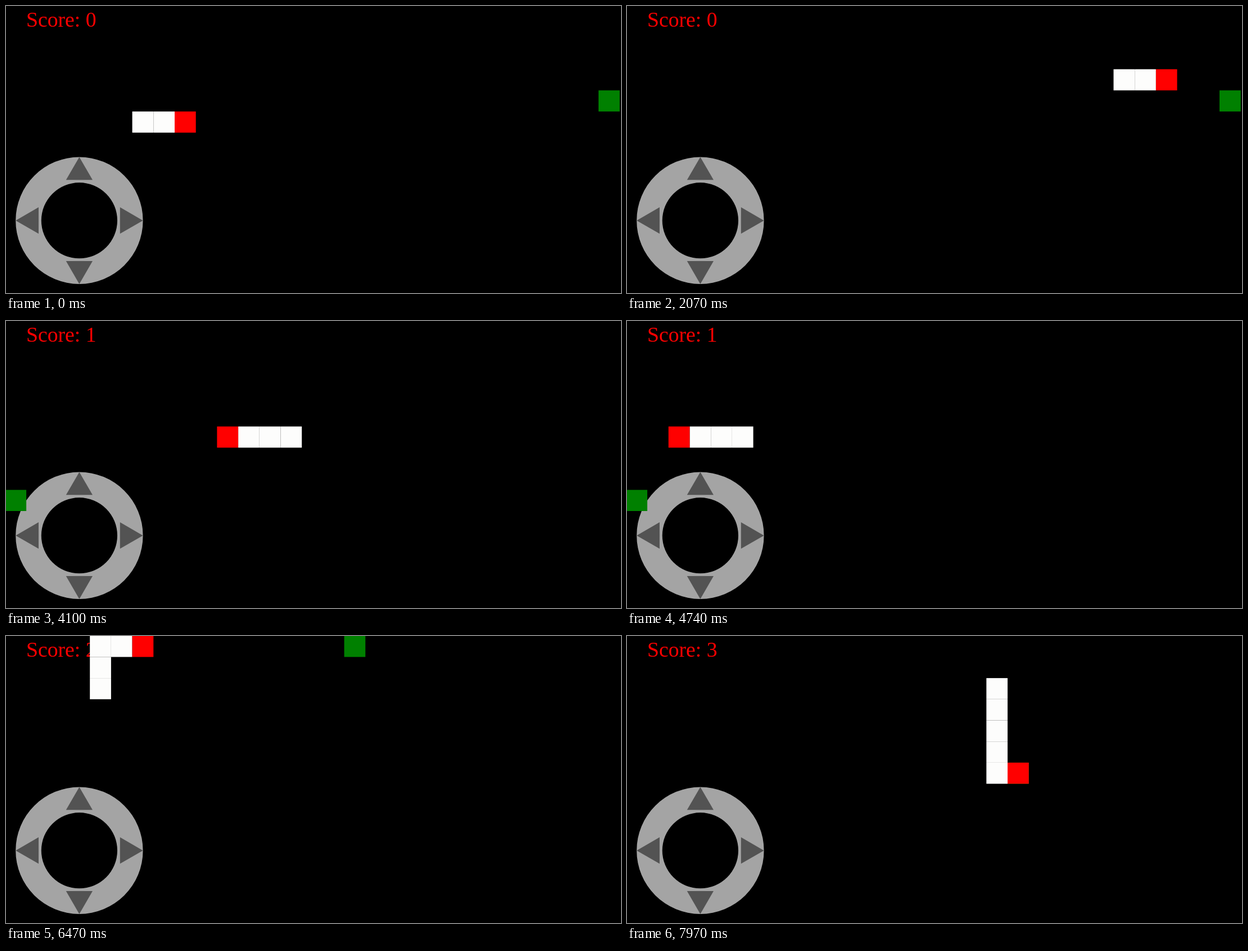
Recreate the animation shown at these times as an HTML page with a canvas. Size 1094 by 512 pixels, loop 8000 ms.

```html
<!DOCTYPE html>
<html lang="en">
<head>
<meta charset="utf-8">
<title>Snake</title>
<style>
  html, body { margin: 0; width: 100%; height: 100%; overflow: hidden; background: #000; }
  canvas { display: block; }
</style>
</head>
<body>
<canvas id="stage" width="1094" height="512"></canvas>
<script>
const ctx = document.getElementById('stage').getContext('2d');
const LOOP = 8000, TICK = 87.5;
const CELL = 37.7, LEFT = -1.6, TOP = -0.3;
const FOODS = [[28, 4], [0, 8], [16, 0], [18, 6]];
const MOVES = 'R4 D2 R6 R5 U4 R5 D1 L4 D1 L24 D3 R4 U8 R13 D6 R1';
const DIRS = { R: [1, 0], L: [-1, 0], U: [0, -1], D: [0, 1] };

// Head positions; the first three cells are the starting body.
const path = [[6, 5], [7, 5], [8, 5]];
for (const move of MOVES.split(' ')) {
  const [dx, dy] = DIRS[move[0]];
  for (let i = +move.slice(1); i > 0; i--) {
    const [x, y] = path[path.length - 1];
    path.push([x + dx, y + dy]);
  }
}

// Steps at which the head reaches each food; it counts one tick later.
const meals = [];
path.forEach(([x, y], i) => {
  const food = FOODS[meals.length];
  if (food && x === food[0] && y === food[1]) meals.push(i - 2);
});

function drawCell([x, y], color) {
  ctx.fillStyle = color;
  ctx.fillRect(LEFT + x * CELL, TOP + y * CELL, CELL, CELL);
}

function drawPad() {
  ctx.save();
  ctx.translate(130.4, 382.7);
  ctx.fillStyle = '#a4a4a4';
  ctx.beginPath();
  ctx.arc(0, 0, 113.2, 0, 2 * Math.PI);
  ctx.arc(0, 0, 67.6, 0, 2 * Math.PI, true);
  ctx.fill();
  ctx.fillStyle = '#535353';
  for (let i = 0; i < 4; i++) {
    ctx.beginPath();
    ctx.moveTo(0, -113.2);
    ctx.lineTo(-23.6, -72.4);
    ctx.lineTo(23.6, -72.4);
    ctx.fill();
    ctx.rotate(Math.PI / 2);
  }
  ctx.restore();
}

function draw(time) {
  const step = Math.min(Math.floor(time / TICK), path.length - 3);
  const score = meals.filter(meal => step > meal).length;
  const body = path.slice(step - score, step + 3);

  ctx.fillStyle = '#000';
  ctx.fillRect(0, 0, 1094, 512);
  drawPad();
  ctx.fillStyle = '#f00';
  ctx.font = '37.7px "Liberation Serif", "Times New Roman", serif';
  ctx.fillText('Score: ' + score, 36, 37);
  drawCell(FOODS[score], '#008000');
  body.forEach((cell, i) => drawCell(cell, i === body.length - 1 ? '#f00' : '#fdfdfc'));
}

function tick() {
  draw(performance.now() % LOOP);
  requestAnimationFrame(tick);
}
tick();
</script>
</body>
</html>
```
